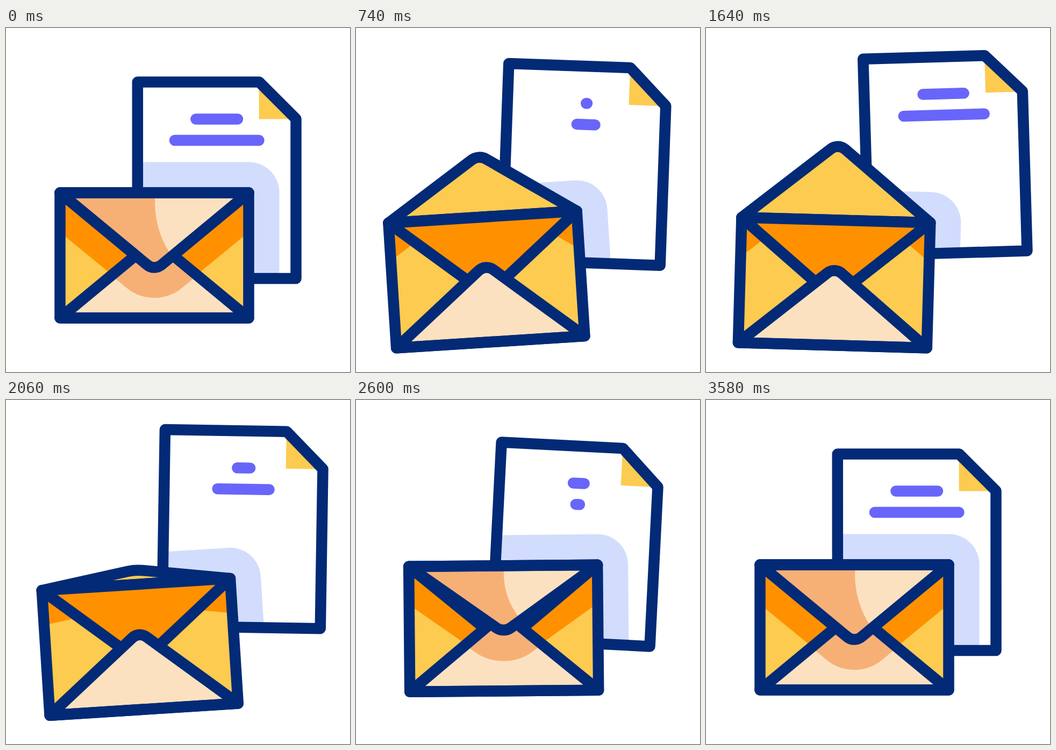
Write an HTML page that moves like this. It is 640 by 640 pixels and loops after 3.6 s.

```html
<!DOCTYPE html>
<html lang="en">
<head>
<meta charset="utf-8">
<title>Letter</title>
<style>
  html, body { margin: 0; width: 100%; height: 100%; overflow: hidden; background: #fff; }
  svg { display: block; width: 100vw; height: 100vh; }
  .line { fill: none; stroke: #032a76; stroke-width: 20.5; stroke-linecap: round; stroke-linejoin: round; }
  .bar { stroke: #6865fa; stroke-width: 20.5; stroke-linecap: round; }
  .yellow { fill: #fccb50; }
  .orange { fill: #ff9100; }
  .cream { fill: #fce1c0; }
  .peach { fill: #f6b076; }
</style>
</head>
<body>
<svg viewBox="0 0 640 640">
  <defs>
    <path id="sheet" d="M244.8 100.5H471L539.5 169V466H244.8Z"/>
    <path id="pocket" d="M100.5 539.5L262.5 405.5C270.5 398.8 281.5 398.8 289.5 405.5L451.5 539.5Z"/>
    <clipPath id="inSheet"><use href="#sheet"/></clipPath>
    <clipPath id="inPocket"><use href="#pocket"/></clipPath>
    <clipPath id="inBody"><rect x="100.5" y="306.5" width="351" height="233"/></clipPath>
    <clipPath id="inFlap"><path class="flapShape"/></clipPath>
  </defs>

  <g id="doc">
    <use href="#sheet" fill="#fff"/>
    <g clip-path="url(#inSheet)">
      <path id="shadow" fill="#d2dcfd" d="M60 249.5H452A56.5 56.5 0 0 1 508.5 306V640H60Z"/>
    </g>
    <path class="yellow" d="M470.7 100.5V169.5H539.5Z"/>
    <line id="bar1" class="bar" y1="169.5" y2="169.5"/>
    <line id="bar2" class="bar" y1="209" y2="209"/>
    <use href="#sheet" class="line"/>
  </g>

  <g id="env">
    <g id="openFlap">
      <path class="flapShape yellow"/>
      <path class="flapShape line"/>
    </g>
    <rect class="yellow" x="100.5" y="306.5" width="351" height="233"/>
    <path class="orange" d="M100.5 306.5H451.5L276 452Z"/>
    <path id="shade" class="orange" clip-path="url(#inBody)"/>
    <path class="line" d="M100.5 306.5L276 452L451.5 306.5"/>
    <use href="#pocket" class="cream"/>
    <path id="cast" class="peach" clip-path="url(#inPocket)"/>
    <use href="#pocket" class="line"/>
    <g id="closedFlap">
      <path class="flapShape cream"/>
      <g clip-path="url(#inFlap)"><path id="flapTone" class="peach"/></g>
      <path class="flapShape line"/>
    </g>
    <rect class="line" x="100.5" y="306.5" width="351" height="233"/>
  </g>
</svg>
<script>
const LOOP = 3600;
const $ = id => document.getElementById(id);
const flaps = document.querySelectorAll('.flapShape');

// Cubic Hermite through [time, value] keys; eased keys are flat at every key.
function track(keys, eased) {
  const last = keys.length - 1;
  const slope = i => eased || i === 0 || i === last ? 0 :
    (keys[i + 1][1] - keys[i - 1][1]) / (keys[i + 1][0] - keys[i - 1][0]);
  return t => {
    if (t <= keys[0][0]) return keys[0][1];
    if (t >= keys[last][0]) return keys[last][1];
    let i = 0;
    while (t >= keys[i + 1][0]) i++;
    const [t0, a] = keys[i], [t1, b] = keys[i + 1];
    const d = t1 - t0, u = (t - t0) / d, v = 1 - u;
    return a + (b - a) * u * u * (3 - 2 * u) +
      d * u * v * (slope(i) * v - slope(i + 1) * u);
  };
}
const ease = keys => track(keys, true);

const envMove = ease([[0, 0], [940, 1], [1705, 1], [2715, 0]]);
const envTurn = ease([[195, 0], [885, -4.1], [1545, 2], [2165, -4.1], [2215, -4.1], [2905, 2], [3590, 0]]);
const docMove = track([[190, 0], [420, .115], [540, .29], [800, .7], [1120, .928], [1400, .99],
  [1640, 1], [1760, 1], [2060, .915], [2160, .86], [2600, .314], [2700, .175], [3000, 0]]);
const docTurn = ease([[400, 0], [1070, 4], [1735, -2], [2400, 4], [3130, -2], [3600, 0]]);
const flapOpen = ease([[0, 1], [913, -.985]]);
const flapShut = track([[1650, -.985], [2060, -.19], [2600, .86], [2830, 1]]);

const pulse = start => ease([0, 1, 2, 3, 4].map(i => [start + 766 * i, 1 - i % 2]));
const pulse1 = pulse(45), pulse2 = pulse(204);

function place(el, x, y, turn, cx, cy) {
  el.setAttribute('transform', `translate(${x} ${y}) rotate(${turn} ${cx} ${cy})`);
}

function setBar(el, half) {
  el.setAttribute('x1', 392.2 - half);
  el.setAttribute('x2', 392.2 + half + .01);
}

function drawFlap(s) {
  const y = v => 306.5 + s * (v - 306.5);
  const shape = `M100.5 306.5L262.5 ${y(440.5)}C270.5 ${y(447.2)} 281.5 ${y(447.2)} 289.5 ${y(440.5)}L451.5 306.5Z`;
  flaps.forEach(p => p.setAttribute('d', shape));
  $('openFlap').style.display = s < 0 ? '' : 'none';
  $('closedFlap').style.display = s < 0 ? 'none' : '';
  $('flapTone').setAttribute('d',
    `M100 306.5H277.8C274.5 ${y(347)} 283 ${y(386)} 306 ${y(420)}L320 ${y(460)}H100Z`);

  // shadow of the flap on the side panels and on the pocket
  const base = 371 + 9 * s * s;
  $('shade').setAttribute('d',
    `M100.5 306.5V${base}L276 ${base + 144 * s}L451.5 ${base}V306.5Z`);
  const tip = 408 + 52 * s + 42 * s * s;
  const c = dy => tip + dy * s;
  $('cast').style.display = s > 0 ? '' : 'none';
  $('cast').setAttribute('d',
    `M100.5 280V${c(-120)}L225 ${c(-18)}C254 ${c(6)} 298 ${c(6)} 327 ${c(-18)}L451.5 ${c(-120)}V280Z`);
}

function draw(t) {
  const e = envMove(t), d = docMove(t);
  const ex = -37.4 * e, ey = 50.8 * e, er = envTurn(t);
  const dx = 52.7 * d, dy = -47.1 * d, dr = docTurn(t);
  place($('env'), ex, ey, er, 276, 423);
  place($('doc'), dx, dy, dr, 392.2, 283.2);
  // the shadow on the sheet follows the envelope, so undo the sheet's pose
  $('shadow').setAttribute('transform',
    `rotate(${-dr} 392.2 283.2) translate(${ex - dx} ${ey - dy}) rotate(${er} 276 423)`);
  setBar($('bar1'), 38.8 * pulse1(t));
  setBar($('bar2'), 78.3 * pulse2(t));
  drawFlap(t < 1300 ? flapOpen(t) : flapShut(t));
}

function tick() {
  draw(performance.now() % LOOP);
  requestAnimationFrame(tick);
}
tick();
</script>
</body>
</html>
```
